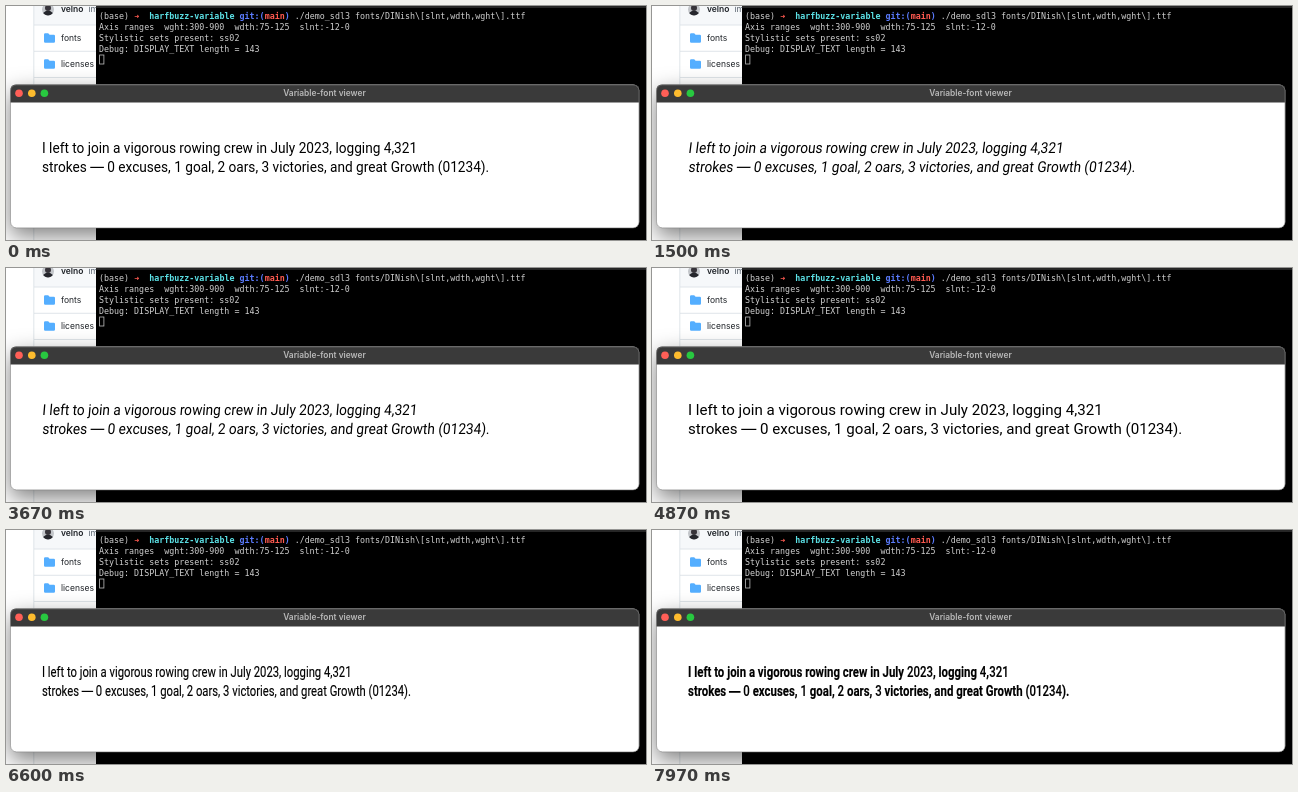
An HTML page that plays this animation: 640x234 px, repeating every 8 s.

```html
<!DOCTYPE html>
<html lang="en">
<head>
<meta charset="utf-8">
<title>Variable-font viewer</title>
<style>
  html, body { margin: 0; width: 100%; height: 100%; overflow: hidden; background: #000; }
  svg { display: block; width: 640px; height: 234px; }
  text { white-space: pre; }
  .ui { font: 8.5px Inter, sans-serif; fill: #1f2328; }
  .user { font-weight: 600; }
  .message { fill: #59636e; }
  .terminal { font: 8.34px "DejaVu Sans Mono", monospace; fill: #d0d0d0; }
  .bold { font-weight: 700; }
  .title { font: 600 8.4px Inter, sans-serif; fill: #b9b9b9; text-anchor: middle; }
  .window { filter: drop-shadow(0 8px 11px rgba(0, 0, 0, .5)); }
  .sample { font-family: Roboto, sans-serif; font-size: 15px; fill: #000; stroke: #000; }
  .dash { font-family: Inter, sans-serif; }
</style>
</head>
<body>
<svg viewBox="0 0 640 234">
  <defs>
    <clipPath id="panel"><path d="M0 0H90V234H0z"/></clipPath>
    <clipPath id="avatar"><circle cx="42" cy="3.5" r="6"/></clipPath>
    <path id="folder" fill="#54aeff" d="M0 1.2Q0 0 1.2 0H4.2L5.6 1.6H9.8Q11 1.6 11 2.8V8.4Q11 9.6 9.8 9.6H1.2Q0 9.6 0 8.4z"/>
  </defs>

  <path fill="#262626" d="M90 0H640V2H90z"/>
  <g clip-path="url(#panel)">
    <path fill="#fff" d="M0 0H90V234H0z"/>
    <path fill="#f6f8fa" d="M28 0H90V19H28z"/>
    <path fill="none" stroke="#d9dfe5" stroke-width=".8" d="M27.8 0V234M28 19H90M28 45.3H90M28 71.5H90"/>
    <g clip-path="url(#avatar)">
      <path fill="#c3c6ca" d="M36 -3H48V10H36z"/>
      <circle cx="42" cy="2" r="3" fill="#37343a"/>
      <ellipse cx="42" cy="9.5" rx="5.5" ry="4.7" fill="#25262c"/>
    </g>
    <use href="#folder" x="38" y="27.2"/>
    <use href="#folder" x="38" y="53.2"/>
    <g class="ui">
      <text class="user" x="55" y="5.8">velno</text>
      <text class="message" x="82.5" y="5.8">im</text>
      <text x="55" y="35.2">fonts</text>
      <text x="55" y="61.2">licenses</text>
    </g>
  </g>

  <g class="terminal" id="terminal"></g>
  <rect x="93.6" y="49" width="4.3" height="9" fill="none" stroke="#bdbdbd" stroke-width=".8"/>

  <rect class="window" x="4.3" y="78.6" width="628.9" height="143.4" rx="6" fill="#fff"/>
  <path fill="#3a3a3a" d="M4.3 96.6V85Q4.3 78.6 10 78.6H627.5Q633.2 78.6 633.2 85V96.6z"/>
  <rect x="4.5" y="78.9" width="628.5" height="143" rx="6" fill="none" stroke="#7d7d7d" stroke-width=".6"/>
  <circle cx="13" cy="87.3" r="3.8" fill="#ff5f57"/>
  <circle cx="25.8" cy="87.3" r="3.8" fill="#febc2e"/>
  <circle cx="38.4" cy="87.3" r="3.8" fill="#28c840"/>
  <text class="title" x="318.5" y="90.3">Variable-font viewer</text>

  <g class="sample" id="sample"></g>
</svg>
<script>
const LOOP = 8000;
const REPEAT_DELAY = 34.8;
const COLUMN = 5.02;
const terminal = document.getElementById("terminal");
const sample = document.getElementById("sample");

function add(parent, tag, content, attrs = {}) {
  const node = document.createElementNS("http://www.w3.org/2000/svg", tag);
  node.textContent = content;
  for (const [name, value] of Object.entries(attrs)) node.setAttribute(name, value);
  return parent.appendChild(node);
}

function print(row, column, content, attrs) {
  add(terminal, "text", content, { x: 93 + column * COLUMN, y: 13 + row * 11, ...attrs });
}

const bold = fill => ({ class: "bold", style: `fill:${fill}` });
print(0, 0, "(base)");
print(0, 7, "➜", bold("#ff5a50"));
print(0, 10, "harfbuzz-variable", bold("#5ce1e6"));
print(0, 28, "git:(", bold("#5b7cff"));
print(0, 33, "main", bold("#ff5a50"));
print(0, 37, ")", bold("#5b7cff"));
print(0, 39, "./demo_sdl3 fonts/DINish\\[slnt,wdth,wght\\].ttf");
print(1, 0, "Axis ranges  wght:300-900  wdth:75-125  slnt:-12-0");
print(2, 0, "Stylistic sets present: ss02");
print(3, 0, "Debug: DISPLAY_TEXT length = 143");

function runClass(run) {
  if (run === "—") return "dash";
  return /\d/.test(run) ? "digits" : "letters";
}

const lines = [
  [147, "I left to join a vigorous rowing crew in July 2023, logging 4,321"],
  [166.3, "strokes — 0 excuses, 1 goal, 2 oars, 3 victories, and great Growth (01234)."]
].map(([y, content]) => {
  const node = add(sample, "text", "");
  for (const run of content.split(/(\d+|—)/)) {
    if (run) add(node, "tspan", run, { class: runClass(run) });
  }
  return { y, node };
});
const digits = sample.querySelectorAll(".digits");

// Steps made by a held key: one on the press, the rest once repeating starts.
function keySteps(t, press, repeatStart, repeats) {
  if (t < press) return 0;
  const repeated = Math.floor((t - repeatStart) / REPEAT_DELAY) + 1;
  return 1 + Math.max(0, Math.min(repeats, repeated));
}

function widthAxis(t) {
  if (t < 4830) return .91;
  if (t < 5900) return 1.006;
  if (t < 6200) return .91;
  return .751;
}

function draw(now) {
  const t = now % LOOP;
  const slant = .48 * (keySteps(t, 500, 1030, 24) - keySteps(t, 2700, 3200, 24));
  const weightSteps = keySteps(t, 7100, 7600, 11);
  const width = widthAxis(t) + weightSteps * .0009;

  sample.style.fontWeight = 370 + weightSteps * 27;
  sample.style.strokeWidth = width < .8 ? .15 : 0;
  for (const run of digits) run.style.fontWeight = 370 + weightSteps * 16;
  for (const { y, node } of lines) {
    node.setAttribute("transform", `translate(36 ${y}) skewX(${-slant}) scale(${width} 1)`);
  }
  requestAnimationFrame(draw);
}

draw(0);
</script>
</body>
</html>
```
